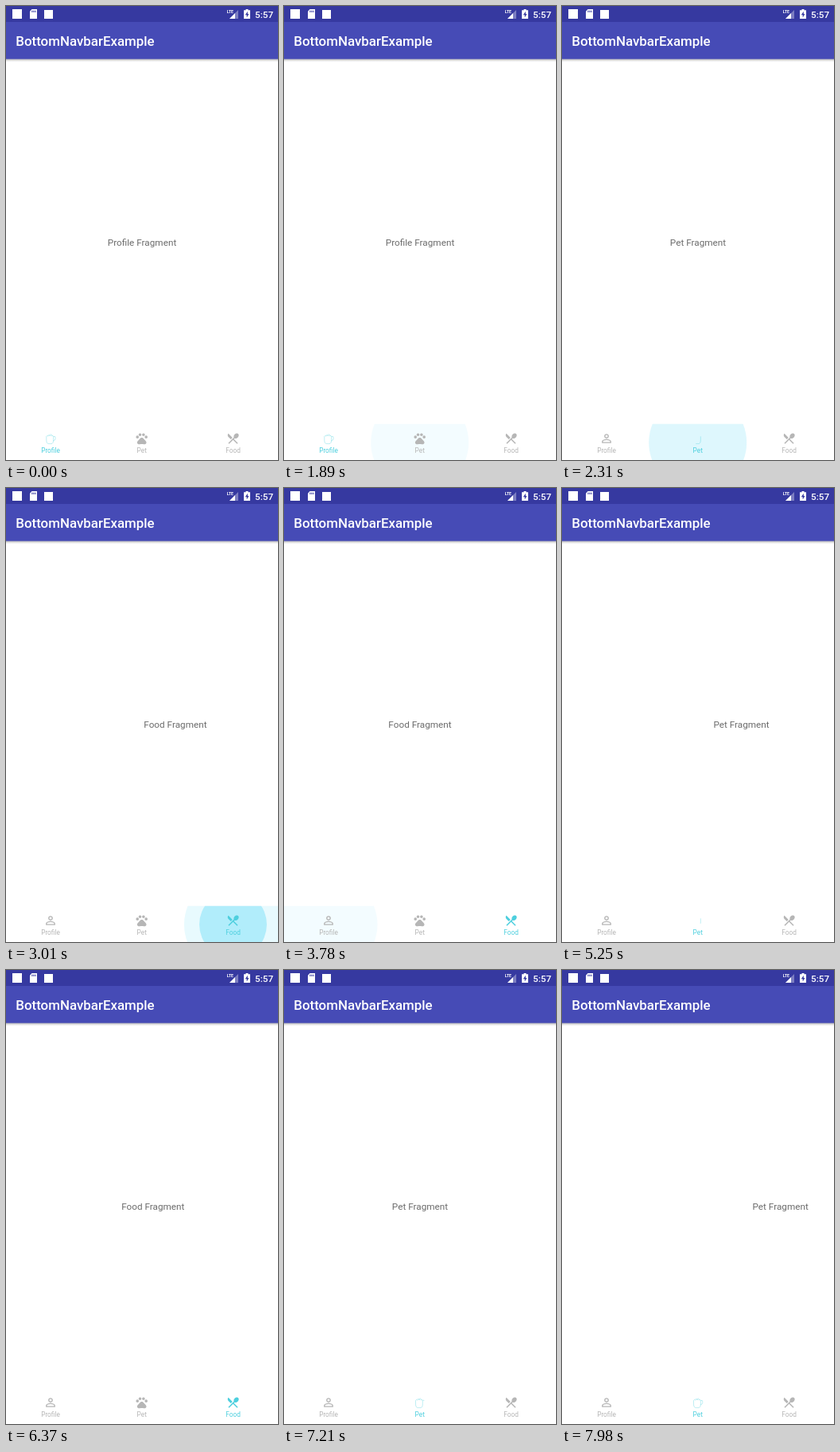
Write an HTML page with a canvas that moves like this. It is 342 px wide and 570 px high and loops after 8000 ms.

```html
<!DOCTYPE html>
<html lang="en">
<head>
<meta charset="utf-8">
<title>Bottom navigation</title>
<style>
html, body { margin: 0; width: 100%; height: 100%; overflow: hidden; background: #fff; }
canvas { display: block; width: 342px; height: 570px; }
</style>
</head>
<body>
<canvas id="stage"></canvas>
<script>
const W = 342, H = 570, LOOP = 8000, BAR_TOP = 524.7, ICON_Y = 543;
const ACCENT = '#4dcfde', IDLE = '#b6b6b6', FONT = 'Roboto, sans-serif';
const canvas = document.getElementById('stage');
const ctx = canvas.getContext('2d');
const dpr = window.devicePixelRatio || 1;
canvas.width = W * dpr;
canvas.height = H * dpr;

const clamp = (v, lo = 0, hi = 1) => Math.min(hi, Math.max(lo, v));

// Icons on a 24-unit grid
const person = new Path2D('M12 5.9a2.1 2.1 0 1 1 0 4.2 2.1 2.1 0 0 1 0-4.2m0 9c2.97 0 6.1 1.46 6.1 2.1v1.1H5.9V17c0-.64 3.13-2.1 6.1-2.1M12 4C9.79 4 8 5.79 8 8s1.79 4 4 4 4-1.79 4-4-1.79-4-4-4zm0 9c-2.67 0-8 1.34-8 4v3h16v-3c0-2.66-5.33-4-8-4z');
const paw = new Path2D('M17.34 14.86c-.87-1.02-1.6-1.89-2.48-2.91-.46-.54-1.05-1.08-1.75-1.32-.7-.17-1.52-.17-2.22 0-.7.24-1.28.78-1.75 1.32-.87 1.02-1.6 1.89-2.48 2.91-1.31 1.31-2.92 2.76-2.62 4.79.29 1.02 1.02 2.03 2.33 2.32.73.15 3.06-.44 5.54-.44h.18c2.48 0 4.81.58 5.54.44 1.31-.29 2.04-1.31 2.33-2.32.31-2.04-1.3-3.49-2.62-4.79z');
for (const [x, y] of [[4.5, 9.5], [9, 5.5], [15, 5.5], [19.5, 9.5]]) {
  paw.moveTo(x + 2.5, y);
  paw.arc(x, y, 2.5, 0, Math.PI * 2);
}
const cutlery = new Path2D('M8.1 13.34l2.83-2.83L3.91 3.5c-1.56 1.56-1.56 4.09 0 5.66l4.19 4.18zm6.78-1.81c1.53.71 3.68.21 5.27-1.38 1.91-1.91 2.28-4.65.81-6.12-1.46-1.46-4.2-1.1-6.12.81-1.59 1.59-2.09 3.74-1.38 5.27L3.7 19.87l1.41 1.41L12 14.41l6.88 6.88 1.41-1.41L13.41 13l1.47-1.47z');
// Cup outline around its centre, in pixels
const cup = new Path2D('M3.6 -2.6V2Q3.6 6.6 .8 6.6H-2.2Q-5.2 6.6 -5.2 2V-2.6Q-4.2 -4.6 -3 -2.8Q-1.9 -6.6 -.7 -3Q.7 -7.6 1.6 -3Q3 -4.4 3.6 -2.6Q6.4 -3.4 6.2 -.4Q6 2.6 3.4 3');
const CUP_LEN = 56, CUP_TIME = 1000;

const PROFILE = 0, PET = 1, FOOD = 2;
const tabs = [
  { name: 'Profile', x: 56, icon: person, draws: true },
  { name: 'Pet', x: 170.7, icon: paw, draws: true },
  { name: 'Food', x: 285.5, icon: cutlery, draws: false }
];

const taps = [
  { tab: PET, at: 1890 },
  { tab: FOOD, at: 2730 },
  { tab: PROFILE, at: 3780 }
];
const selections = [
  [-2000, PROFILE], [2065, PET], [2939, FOOD], [3980, PROFILE],
  [5140, PET], [5910, FOOD], [6470, PET]
];
// Page moves: a tap glides, a swipe follows the finger
const moves = [
  { at: 2065, from: PROFILE, to: PET, glide: 210 },
  { at: 2939, from: PET, to: FOOD, glide: 210 },
  { at: 3980, from: FOOD, to: PROFILE, glide: 300 },
  { at: 4970, from: PROFILE, to: PET },
  { at: 5740, from: PET, to: FOOD },
  { at: 6302, from: FOOD, to: PET },
  { at: 7835, from: PET, to: PROFILE }
];
const SWIPE = [0, 14, 93, 217, 287, 320, 335, 342], SWIPE_STEP = 70;

function swipe(ms) {
  const k = clamp(ms / SWIPE_STEP, 0, SWIPE.length - 1);
  const i = Math.min(Math.floor(k), SWIPE.length - 2);
  return (SWIPE[i] + (SWIPE[i + 1] - SWIPE[i]) * (k - i)) / W;
}

function pageAt(t) {
  let page = PROFILE;
  for (const m of moves) {
    if (t < m.at) break;
    const ms = t - m.at;
    const p = m.glide ? 1 - (1 - clamp(ms / m.glide)) ** 5 : swipe(ms);
    page = m.from + (m.to - m.from) * p;
  }
  return page;
}

function text(str, x, y, size, color, weight = 400, align = 'left') {
  ctx.font = `${weight} ${size}px ${FONT}`;
  ctx.textAlign = align;
  ctx.fillStyle = color;
  ctx.fillText(str, x, y);
}

function rect(x, y, w, h, color) {
  ctx.fillStyle = color;
  ctx.fillRect(x, y, w, h);
}

function shape(d, color) {
  ctx.fillStyle = color;
  ctx.fill(new Path2D(d));
}

function drawHeader() {
  const shadow = ctx.createLinearGradient(0, 66, 0, 70);
  shadow.addColorStop(0, 'rgba(0,0,0,.3)');
  shadow.addColorStop(1, 'rgba(0,0,0,0)');
  rect(0, 66, W, 4, shadow);
  rect(0, 20, W, 46.6, '#464bb6');
  rect(0, 0, W, 20, '#3639a0');

  rect(8, 4, 12, 12, '#fff');
  shape('M32.5 4H39V16H30V6.8z', '#fff');
  for (let i = 0; i < 3; i++) rect(32.4 + i * 2, 5.6, 1, 2.4, '#3639a0');
  rect(48, 5, 11, 11, '#fff');

  text('LTE', 277.7, 8.9, 5.1, '#fff', 700);
  shape('M292 5V16H281z', 'rgba(255,255,255,.35)');
  shape('M288 9V16H281z', '#fff');
  shape('M301.5 4H304.5V5.2H307V16H299V5.2H301.5z', '#fff');
  shape('M303.8 6.8L300.8 11.2H302.7V14.6L305.4 10H303.8z', '#3639a0');
  text('5:57', 313, 14.8, 11.7, '#fff', 500);
  text('BottomNavbarExample', 12.3, 50, 16.9, '#fff', 500);
}

function drawPages(t) {
  const page = pageAt(t);
  tabs.forEach((tab, i) => {
    text(tab.name + ' Fragment', 171 + (i - page) * W, 300.8, 11.75, '#6c6c6c', 400, 'center');
  });
}

function disc(x, r, alpha) {
  if (r <= 0 || alpha <= 0) return;
  ctx.fillStyle = `rgba(48,204,240,${alpha})`;
  ctx.beginPath();
  ctx.arc(x, 548, r, 0, Math.PI * 2);
  ctx.fill();
}

function drawRipples(t) {
  ctx.save();
  ctx.beginPath();
  ctx.rect(0, BAR_TOP, W, H - BAR_TOP);
  ctx.clip();
  for (const tap of taps) {
    const ms = t - tap.at;
    if (ms < 0 || ms > 700) continue;
    const x = tabs[tap.tab].x;
    const glow = (0.06 + 0.05 * clamp(ms / 100)) * (1 - clamp((ms - 300) / 400));
    disc(x, 61.5, glow);
    disc(x, 61.5 * clamp((ms - 50) / 335), 0.3 * (1 - clamp((ms - 280) / 195)));
  }
  ctx.restore();
}

function drawCup(x, progress) {
  ctx.save();
  ctx.translate(x, ICON_Y);
  ctx.strokeStyle = ACCENT;
  ctx.globalAlpha = 0.6;
  ctx.lineWidth = 0.6;
  ctx.setLineDash([CUP_LEN * progress, CUP_LEN * 2]);
  ctx.stroke(cup);
  ctx.restore();
}

function drawIcon(icon, x, color) {
  ctx.save();
  ctx.translate(x, ICON_Y);
  ctx.scale(0.73, 0.73);
  ctx.translate(-12, -12);
  ctx.fillStyle = color;
  ctx.fill(icon, icon === person ? 'evenodd' : 'nonzero');
  ctx.restore();
}

function drawTabs(t) {
  const [since, active] = selections.filter(s => s[0] <= t).pop();
  tabs.forEach((tab, i) => {
    const color = i === active ? ACCENT : IDLE;
    if (i === active && tab.draws) drawCup(tab.x, clamp((t - since) / CUP_TIME));
    else drawIcon(tab.icon, tab.x, color);
    text(tab.name, tab.x, 560.6, 8.3, color, 400, 'center');
  });
}

function draw(t) {
  ctx.setTransform(dpr, 0, 0, dpr, 0, 0);
  rect(0, 0, W, H, '#fff');
  drawPages(t);
  drawHeader();
  drawRipples(t);
  drawTabs(t);
}

const start = performance.now();
function tick() {
  draw((performance.now() - start) % LOOP);
  requestAnimationFrame(tick);
}
tick();
</script>
</body>
</html>
```
